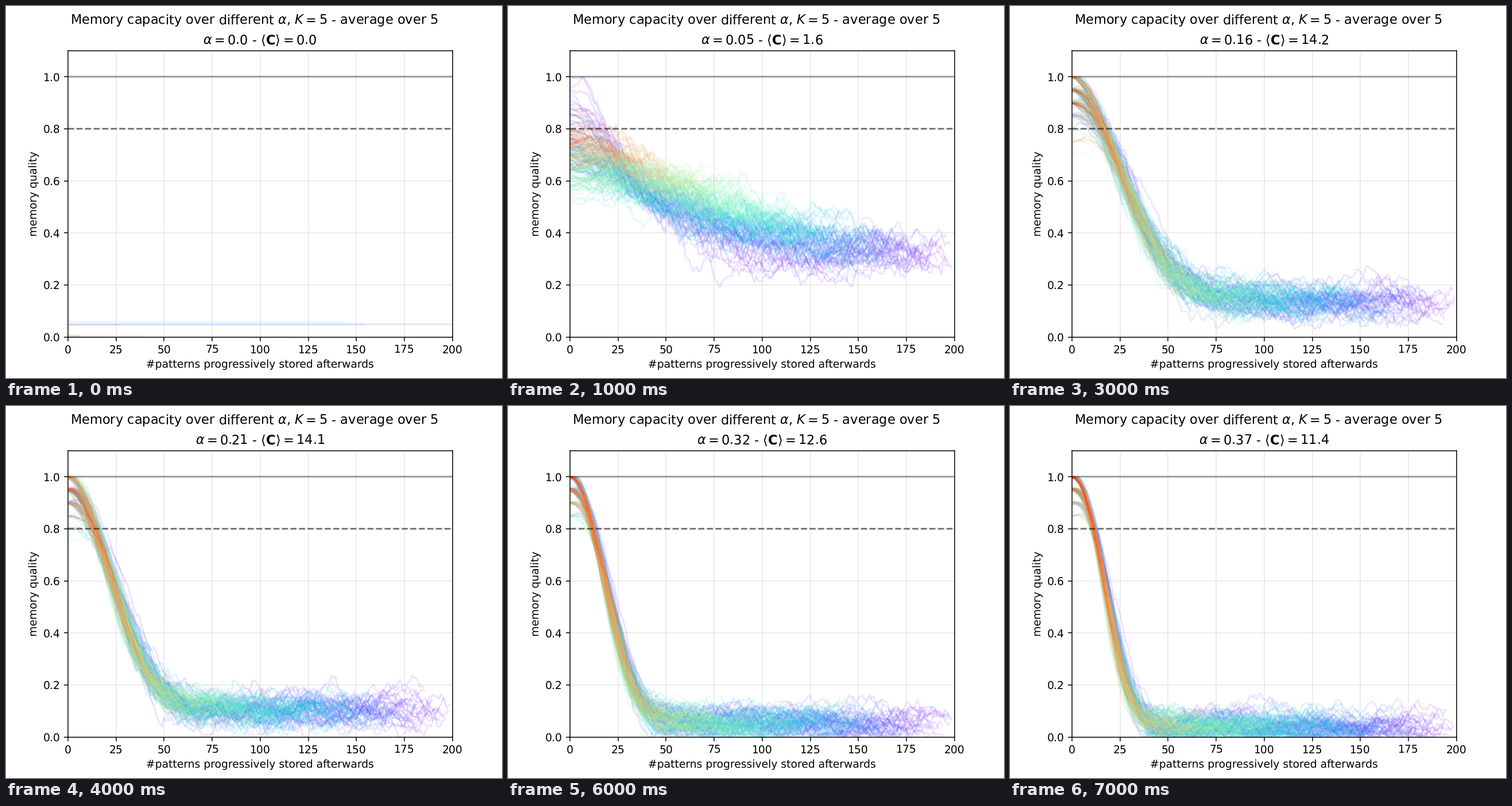
A matplotlib script for the animation above (8000 ms loop, 864 px wide and 648 px high).

```python
import numpy as np
import matplotlib.pyplot as plt
from matplotlib.animation import FuncAnimation
from matplotlib.collections import LineCollection

PATTERNS = 200
ALPHAS = np.linspace(0, 1, 20)[:8]
CAPACITY = [0.0, 1.6, 12.0, 14.2, 14.1, 13.6, 12.6, 11.4]
# Lines present before any learning: (length, quality)
IDLE = [(200, 0.05), (155, 0.05), (144, 0.06), (114, 0.005),
        (40, 0.005), (27, 0.048), (6, 0.005)]

plt.rcParams["text.hinting"] = "none"


def color(length):
    return plt.cm.rainbow(1 - length / PATTERNS, alpha=0.125)


def smooth_noise(rng, n, width):
    """Unit-variance moving average of white noise."""
    white = rng.normal(size=n + width - 1)
    return np.convolve(white, np.ones(width), "valid") / np.sqrt(width)


def weak_params(rng, age):
    """Slow, widely spread decay of the weakest learning rate."""
    mean = 0.61 + 0.34 * np.exp(-age / 0.12) + 0.17 * age ** 2
    start = mean + rng.normal(0, 0.06)
    floor = 0.3 + 0.2 * age
    half = 27 + 33 * np.sqrt(age)
    steep = 1.3 + 0.4 * np.exp(-age / 0.1)
    return mean, start, floor, half, steep


def strong_params(rng, alpha, age):
    """Decay that gets faster, tighter and deeper as alpha grows."""
    errors = 0.25 / alpha
    start = 1 - 0.05 * min(rng.poisson(errors), 6) + rng.normal(0, 0.003)
    shift = (0.3 * (age - 0.6) ** 2 - 0.03) * alpha / 0.37
    half = 11.14 * alpha ** -0.545 * (1 + shift + rng.normal(0, 0.045))
    floor = 0.34 * np.exp(-6.1 * alpha)
    return 1 - 0.05 * errors, start, floor, half, 1.7 + 1.7 * alpha


def curve(rng, alpha, length):
    age = 1 - length / PATTERNS
    if alpha < 0.1:
        mean, start, floor, half, steep = weak_params(rng, age)
    else:
        mean, start, floor, half, steep = strong_params(rng, alpha, age)
    x = np.arange(length)
    spread = (0.03 + 0.04 * floor) * (1.15 - 0.5 * age)
    floor = floor * (1 + 0.5 * np.exp(-x / 60))
    fall = np.exp(-np.log(2) * (x / half) ** steep)
    y = floor + (mean - floor) * fall
    y += (start - mean) * np.exp(-(x / (0.55 * half)) ** 2)
    wobble = smooth_noise(rng, length, 24) + 0.25 * smooth_noise(rng, length, 4)
    y += spread * wobble * (1 - np.exp(-x / 14))
    y = np.abs(y)
    return np.column_stack([x, np.where(y > 1, 2 - y, y)])


def bundle(step):
    if step == 0:
        lengths = [n for n, _ in IDLE]
        lines = [[(0, q), (n, q)] for n, q in IDLE]
    else:
        rng = np.random.default_rng(40 + step)
        lengths = range(PATTERNS, 1, -1)
        lines = [curve(rng, ALPHAS[step], n) for n in lengths]
    return lines, [color(n) for n in lengths]


fig, ax = plt.subplots(figsize=(6.4, 4.8), dpi=135)
fig.suptitle(r"Memory capacity over different $\alpha$, $K = 5$ - average over 5")
ax.set(xlim=(0, PATTERNS), ylim=(0, 1.1),
       xlabel="#patterns progressively stored afterwards",
       ylabel="memory quality")
ax.set_yticks(np.arange(0, 1.1, 0.2))
ax.grid(alpha=0.3)
for level, style, opacity in [(1, "-", 0.37), (0.8, "--", 0.55)]:
    ax.plot([0, PATTERNS], [level, level], style, color="black",
            alpha=opacity, zorder=3, snap=False)

curves = LineCollection([], linewidths=1.5, zorder=2.1)
ax.add_collection(curves)
bundles = [bundle(step) for step in range(len(ALPHAS))]


def update(step):
    lines, colors = bundles[step]
    curves.set_segments(lines)
    curves.set_color(colors)
    alpha = round(ALPHAS[step], 2)
    ax.set_title(rf"$\alpha = {alpha}$ - $\langle \mathbf{{C}} \rangle = {CAPACITY[step]}$")
    return [curves]


anim = FuncAnimation(fig, update, frames=len(ALPHAS), interval=1000,
                     repeat=True, repeat_delay=0)
plt.show()
```
